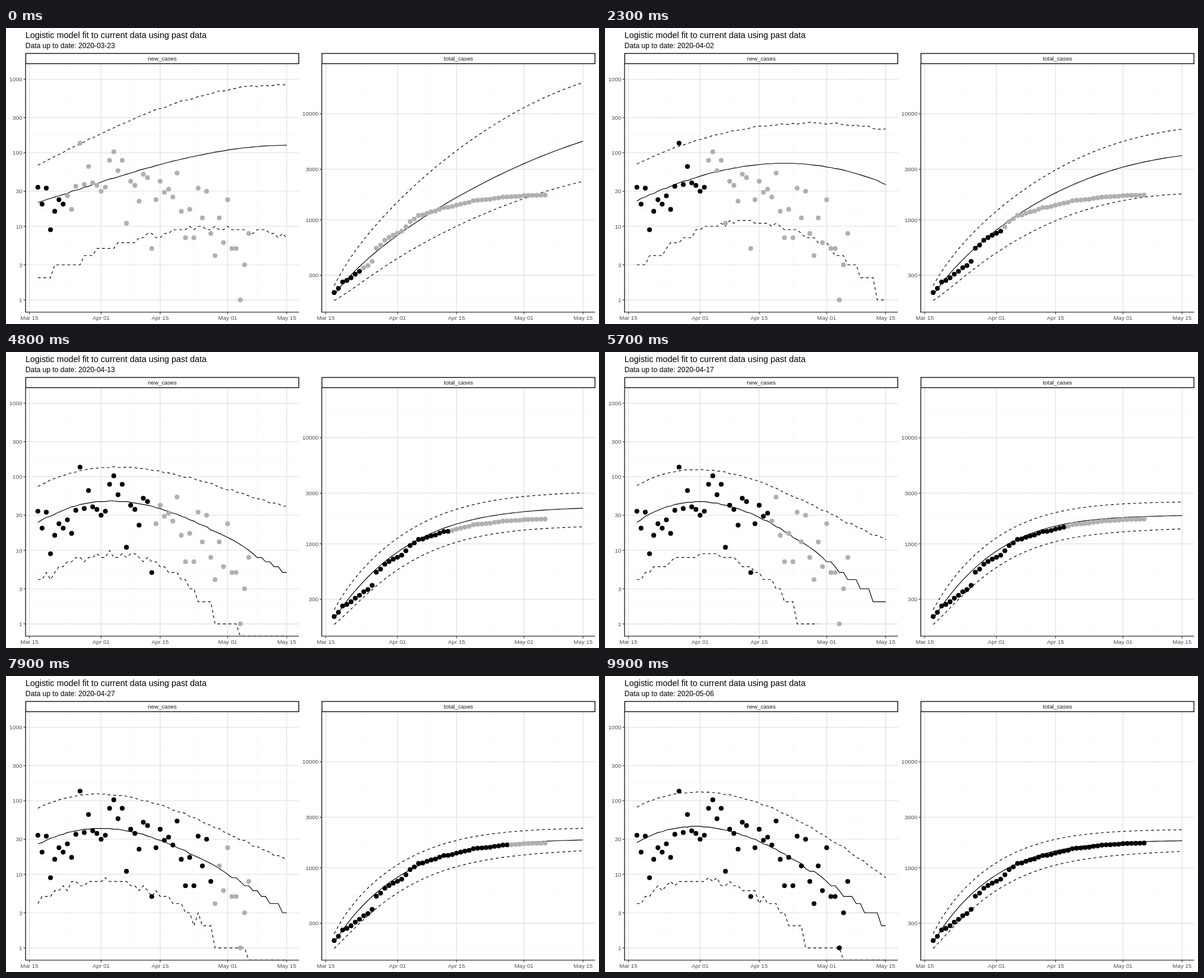
Animation of 1000x500 px, one loop 10000 ms. Source, as an HTML page:

```html
<!DOCTYPE html>
<html lang="en">
<head>
<meta charset="utf-8">
<title>Logistic model fit</title>
<style>
  html, body { margin: 0; width: 100%; height: 100%; overflow: hidden; background: #fff; }
  svg { display: block; width: 1000px; height: 500px; font-family: "Liberation Sans", Arial, sans-serif; }
</style>
</head>
<body>
<svg id="stage" viewBox="0 0 1000 500"></svg>
<script>
const stage = document.getElementById("stage");
const DAYS = 60, FRAMES = 100, FRAME_MS = 100, LAST = 44, PER_STATE = 2.25;
const TOP = 60.5, BOTTOM = 480, WIDTH = 461;

function add(parent, tag, attrs, text) {
  const el = document.createElementNS("http://www.w3.org/2000/svg", tag);
  for (const key in attrs) el.setAttribute(key, attrs[key]);
  if (text !== undefined) el.textContent = text;
  parent.appendChild(el);
  return el;
}

const mix = (a, b, f) => a + (b - a) * f;
const dayX = day => 39.5 + 7.113 * day;          // day 0 is Mar 15
const newY = v => 459.3 - 124.27 * Math.log10(v);
const newValue = y => 10 ** ((459.3 - y) / 124.27);
const totalY = v => 324 - 179.1 * (Math.log10(v) - 3);

// Observed daily counts; the totals follow from them.
const newCases = [
  34, 20, 33, 9, 16, 23, 20, 26, 17, 35, 135, 37, 65, 39, 36, 30, 34, 79, 103, 57, 79, 11, 41, 36, 22, 51,
  46, 5, 23, 41, 29, 32, 25, 53, 16, 7, 17, 7, 33, 13, 30, 8, 4, 13, 6, 23, 5, 5, 1, 3, 8];
let sum = 172;
const totalCases = newCases.map(n => sum += n);

// Heights of the daily curves on days 20, 40 and 59 at a few states; day 0 is set by rule.
const KNOTS = [0, 20, 40, 59];
const fits = [
  { state: 0, mid: [249, 212.5, 198], high: [162, 112, 97], low: [364, 338, 354] },
  { state: 4, mid: [217, 172.5, 185], high: [141.5, 91, 84], low: [333, 293, 366] },
  { state: 10, mid: [241, 230, 264], high: [178.5, 160.5, 172], low: [333, 350, 454] },
  { state: 17, mid: [248, 266, 321], high: [187, 188.5, 206], low: [337, 397, 610] },
  { state: 25, mid: [257, 326, 430], high: [202, 253, 317], low: [346, 458, 730] },
  { state: 35, mid: [260.5, 314, 400], high: [202.5, 249, 310], low: [349, 425, 578] },
  { state: 44, mid: [258.5, 323, 420], high: [198.5, 251, 340], low: [347, 436, 601] }
];
const startHeight = {
  mid: s => 295 - 0.3 * s,
  high: s => 232 - 0.25 * s,
  low: s => 422 - 38 * Math.min(1, s / 25)
};

// Cubic through the four knots, blended between neighbouring fits
function curve(name, state) {
  const j = Math.max(1, fits.findIndex(f => f.state >= state));
  const a = fits[j - 1], b = fits[j];
  const f = (state - a.state) / (b.state - a.state);
  const ys = [startHeight[name](state), ...a[name].map((y, i) => mix(y, b[name][i], f))];
  return day => ys.reduce((total, y, i) => total + KNOTS.reduce((part, knot, m) =>
    m === i ? part : part * (day - knot) / (KNOTS[i] - knot), y), 0);
}

// Totals: running sum of the daily curve, inside a band that narrows as data arrive
function totals(mid, state) {
  const highEnd = 18 + 81 * Math.exp(-state / 9);
  const lowEnd = 18 + 50 / (1 + Math.exp((state - 18) / 3));
  const out = { mid: [], high: [], low: [] };
  let cases = 0;
  for (let day = 0; day < DAYS; day++) {
    const d = day / 59;
    if (day) cases += newValue(mid(day));
    const y = totalY(196 + cases * (1.12 + 0.1 * (1 - state / LAST) * d));
    out.mid.push(y);
    out.high.push(y - mix(22, highEnd, 1 - (1 - d) ** 2) + 6.5 * Math.exp(-day / 3));
    out.low.push(y + mix(30, lowEnd, d) - 20.5 * Math.exp(-day / 4));
  }
  return out;
}

function random(day, seed) {
  const h = Math.sin(day * 12.9898 + seed * 78.233) * 43758.5453;
  return h - Math.floor(h) - 0.5;
}

// Static layer
const panels = [
  { x: 33, shift: 0, title: "new_cases", y: newY, ticks: [1, 3, 10, 30, 100, 300, 1000] },
  { x: 532.5, shift: 499.7, title: "total_cases", y: totalY, ticks: [300, 1000, 3000, 10000] }
];
const dates = [[0, "Mar 15"], [17, "Apr 01"], [31, "Apr 15"], [47, "May 01"], [61, "May 15"]];
const line = (x1, y1, x2, y2, stroke, width) =>
  add(stage, "line", { x1, y1, x2, y2, stroke, "stroke-width": width });
const label = (x, y, size, fill, anchor, text) =>
  add(stage, "text", { x, y, "font-size": size, fill, "text-anchor": anchor }, text);

add(stage, "rect", { width: 1000, height: 500, fill: "#fff" });
label(32.7, 17.3, 14.4, "#000", "start", "Logistic model fit to current data using past data");
const subtitle = label(32.7, 34, 12.08, "#000", "start", "");

panels.forEach((p, n) => {
  const right = p.x + WIDTH;
  const across = (y, color, width) => line(p.x, y, right, y, color, width);
  const down = (day, color, width) =>
    line(dayX(day) + p.shift, TOP, dayX(day) + p.shift, BOTTOM, color, width);

  // Minor lines lie halfway between the major ones, on the log scale.
  const inner = p.ticks.slice(1).map((v, i) => Math.sqrt(v * p.ticks[i]));
  const outer = n ? [Math.sqrt(300 * 100), Math.sqrt(10000 * 30000)] : [];
  for (const v of [...inner, ...outer]) across(p.y(v), "#f3f3f3", 0.6);
  dates.slice(1).forEach(([d], i) => down((d + dates[i][0]) / 2, "#f3f3f3", 0.6));
  for (const v of p.ticks) across(p.y(v), "#dedede", 1.15);
  for (const [d] of dates) down(d, "#dedede", 1.15);

  const clip = add(stage, "clipPath", { id: "panel" + n });
  add(clip, "rect", { x: p.x, y: TOP, width: WIDTH, height: BOTTOM - TOP });
  const plot = add(stage, "g", { "clip-path": `url(#panel${n})` });
  const path = dash => add(plot, "path", { fill: "none", stroke: "#000", "stroke-width": 1.15, "stroke-dasharray": dash });
  p.mid = path("none");
  p.high = path("4.7 4.7");
  p.low = path("4.7 4.7");
  p.dots = (n ? totalCases : newCases).map((v, i) =>
    add(plot, "circle", { cx: dayX(i + 2) + p.shift, cy: p.y(v), r: 4.05 }));

  add(stage, "rect", { x: p.x + 0.3, y: 43, width: WIDTH - 0.6, height: 17.3, fill: "#fff", stroke: "#000", "stroke-width": 1.3 });
  label(p.x + WIDTH / 2, 55.3, 9.78, "#1a1a1a", "middle", p.title);
  line(p.x, TOP, p.x, BOTTOM + 0.6, "#000", 1.2);
  across(BOTTOM, "#000", 1.2);
  for (const v of p.ticks) {
    line(p.x - 3.5, p.y(v), p.x, p.y(v), "#333", 1.15);
    label(p.x - 5.6, p.y(v) + 3.5, 9.78, "#4d4d4d", "end", v);
  }
  for (const [d, text] of dates) {
    const x = dayX(d) + p.shift;
    line(x, BOTTOM, x, BOTTOM + 3.5, "#333", 1.15);
    label(x, 493, 9.78, "#4d4d4d", "middle", text);
  }
});

function trace(path, shift, heightAt) {
  let d = "";
  for (let i = 0; i < DAYS; i++) {
    const y = heightAt(i);
    if (y === null) break;
    d += (i ? "L" : "M") + (dayX(i + 2) + shift).toFixed(2) + " " + y.toFixed(2);
  }
  path.setAttribute("d", d);
}

// A state may rest for a second frame: nearly always early on, twice in 18 frames later.
const startOf = state => Math.ceil(state * PER_STATE);
const isStart = n => startOf(Math.floor(n / PER_STATE)) === n;
const held = n => n % 18 === 4 || n % 18 === 15 || (n < 29 && n % 18 !== 13 && isStart(n - 1));

function draw(n) {
  const k = Math.min(LAST, Math.floor(n / PER_STATE));
  const part = held(n) ? 0 : (n - startOf(k)) / (startOf(k + 1) - startOf(k));
  const state = Math.min(LAST, k + part);
  const resting = held(n) || held(n + 1);
  const [fresh, total] = panels;

  const shown = new Date(Date.UTC(2020, 2, 23 + Math.round(state)));
  subtitle.textContent = "Data up to date: " + shown.toISOString().slice(0, 10);

  const mid = curve("mid", state), high = curve("high", state), low = curve("low", state);
  const noise = (i, salt) => mix(random(i, k + salt), random(i, k + 1 + salt), part);
  const count = y => Math.round(newValue(y));

  trace(fresh.mid, 0, i => newY(Math.max(1, count(mid(i)))));
  trace(fresh.high, 0, i => newY(count(high(i) + noise(i, 0) * (1 + i / 20))));
  // Zero has no logarithm: the line ends at rest and drops to the axis in motion.
  trace(fresh.low, 0, i => {
    const v = count(low(i) + noise(i, 100) * 10);
    return v > 0 ? newY(v) : resting ? null : BOTTOM;
  });

  const sums = totals(mid, state);
  for (const name in sums) trace(total[name], total.shift, i => sums[name][i]);

  for (const p of panels) p.dots.forEach((dot, i) => {
    const grey = Math.round(176 * Math.min(1, Math.max(0, i - 6 - state)));
    dot.setAttribute("fill", `rgb(${grey},${grey},${grey})`);
  });
}

let last = -1;
function tick() {
  const n = Math.floor(performance.now() / FRAME_MS) % FRAMES;
  if (n !== last) draw(last = n);
  requestAnimationFrame(tick);
}
tick();
</script>
</body>
</html>
```
